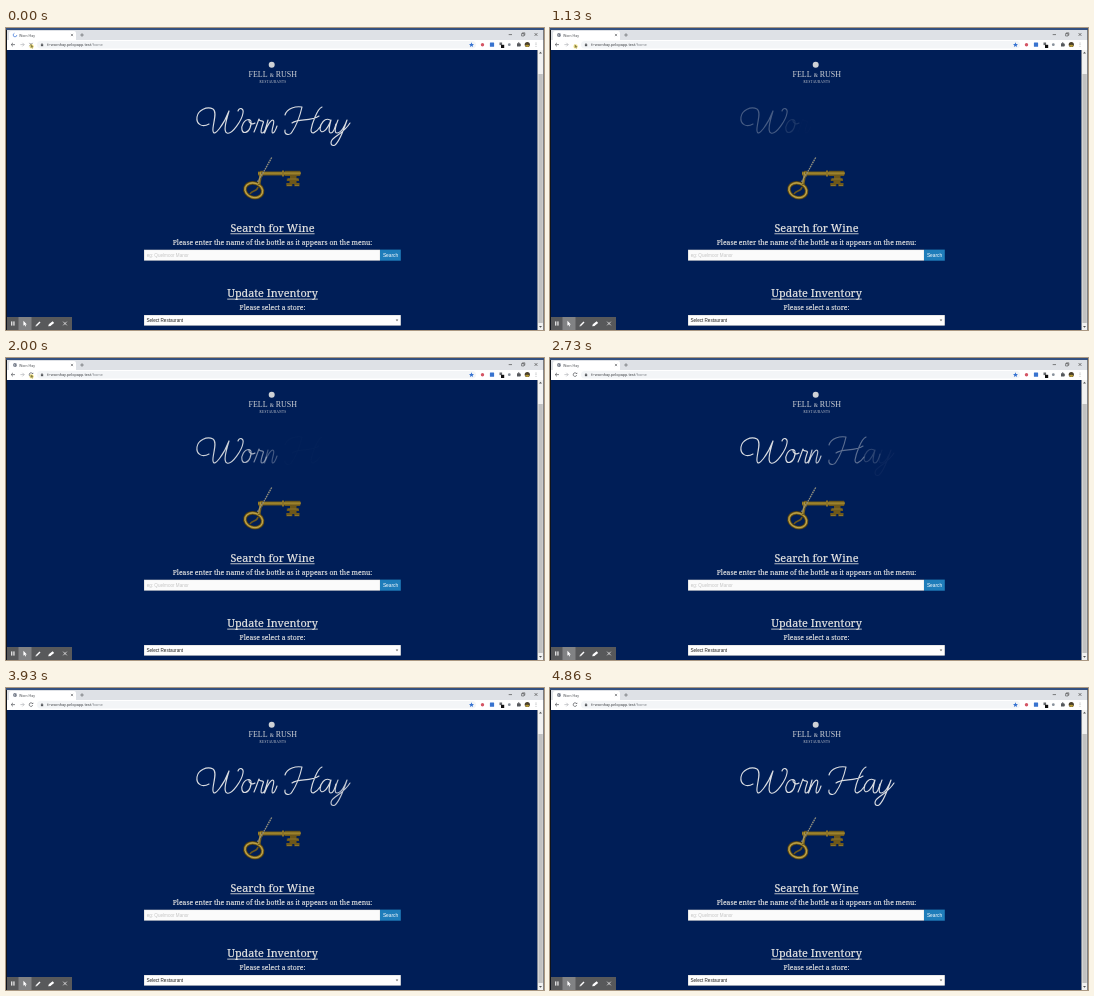
An HTML page with a canvas for the animation above (4.93 s loop, 538 by 302 pixels).

```html
<!DOCTYPE html>
<html lang="en">
<head>
<meta charset="utf-8">
<title>Worn Hay</title>
<style>
  html, body { margin: 0; width: 100%; height: 100%; overflow: hidden; background: #001e57; }
  canvas { display: block; width: 538px; height: 302px; }
</style>
</head>
<body>
<canvas id="stage"></canvas>
<script>
const W = 538, H = 302, LOOP = 4930;
const RELOADED = 400;       // old page disappears
const FADE = { start: 400, step: 295, length: 1900 };
const SANS = '"Liberation Sans", Arial, sans-serif';
const UI = 'Roboto, sans-serif';
const SLAB = '"Noto Serif", serif';
const ROMAN = '"Liberation Serif", serif';
const NAVY = '#001e57', CREAM = '#e4e4e2', LOGO = '#cfd2d6', INK = '#55585c';

const canvas = document.getElementById('stage');
const ctx = canvas.getContext('2d');
const dpr = window.devicePixelRatio || 1;
canvas.width = Math.round(W * dpr);
canvas.height = Math.round(H * dpr);

function rect(x, y, w, h, color) {
  ctx.fillStyle = color;
  ctx.fillRect(x, y, w, h);
}

function round(x, y, w, h, r, color) {
  ctx.fillStyle = color;
  ctx.beginPath();
  ctx.roundRect(x, y, w, h, r);
  ctx.fill();
}

function disc(x, y, r, color) {
  ctx.fillStyle = color;
  ctx.beginPath();
  ctx.arc(x, y, r, 0, Math.PI * 2);
  ctx.fill();
}

function stroke(d, color, width = 0.8) {
  ctx.strokeStyle = color;
  ctx.lineWidth = width;
  ctx.stroke(new Path2D(d));
}

function fill(d, color) {
  ctx.fillStyle = color;
  ctx.fill(new Path2D(d));
}

function text(str, x, y, size, font, color, align = 'left') {
  ctx.font = `${size}px ${font}`;
  ctx.fillStyle = color;
  ctx.textAlign = align;
  ctx.fillText(str, x, y);
  return ctx.measureText(str).width;
}

function cross(x, y, r, color, width) {
  stroke(`M${x - r} ${y - r}L${x + r} ${y + r}M${x + r} ${y - r}L${x - r} ${y + r}`, color, width);
}

function arc(x, y, r, from, to, color, width) {
  ctx.strokeStyle = color;
  ctx.lineWidth = width;
  ctx.beginPath();
  ctx.arc(x, y, r, from, to);
  ctx.stroke();
}

function drawTabs(t) {
  rect(0, 0, W, H, '#10141c');
  rect(0, 0, W, 2, '#34507f');
  rect(1, 2, 536.5, 10, '#dee1e6');
  round(3, 3, 67, 10, [2, 2, 0, 0], '#ffffff');
  if (t < RELOADED) {
    const a = t / 110;
    arc(9, 7, 1.8, a, a + 4.4, '#3f78d8', 0.7);
  } else {
    disc(9, 7, 1.9, '#6a7280');
    stroke('M7.8 6.2L9 7L8.6 8.3M9.5 5.6L10.4 6.6', '#ffffff', 0.5);
  }
  text('Worn Hay', 13, 8.5, 3.7, UI, '#55585c');
  cross(66, 7, 1.1, INK, 0.6);
  stroke('M74.2 7H77.8M76 5.2V8.8', INK, 0.6);
  stroke('M502.7 6.6H506', '#333333', 0.6);
  stroke('M515.6 5.6H518V8H515.6ZM516.4 5.6V4.8H518.8V7.2H518', '#333333', 0.5);
  cross(530, 6.5, 1.4, '#333333', 0.6);
}

function drawReload(t) {
  if (t < RELOADED) {
    cross(25, 16.5, 1.6, INK, 0.7);
  } else if (t >= 1700) {
    arc(25, 16.6, 1.8, 0.3, 5.4, INK, 0.7);
    fill('M25.5 16.1H27.2V14.4Z', INK);
  }
  if (t < 2300) {
    disc(25.6, 18.4, 2.2, 'rgba(245, 222, 70, 0.6)');
    fill('M24.7 16.2V20L25.6 19.2L26.2 20.5L26.9 20.2L26.3 18.9H27.5Z', '#857d4a');
  }
}

function drawToolbar(t) {
  rect(1, 12, 536.5, 10, '#ffffff');
  round(31, 13, 439, 7.6, 3.8, '#f3f5f7');
  stroke('M9 16.6H5.2M7 14.8L5.2 16.6L7 18.4', INK, 0.7);
  stroke('M14.4 16.6H18.2M16.4 14.8L18.2 16.6L16.4 18.4', '#b4b7bb', 0.7);
  drawReload(t);
  rect(34.9, 16.2, 2.3, 2, INK);
  arc(36, 16.2, 0.7, Math.PI, Math.PI * 2, INK, 0.5);
  const host = text('fr-wornhay.pelopapp.test', 41, 18.1, 4, UI, '#44474b');
  text('/home', 41 + host, 18.1, 4, UI, '#85898e');

  fill('M465.5 14.3L466.2 15.9L468 16.1L466.7 17.2L467.1 18.9L465.5 18L463.9 18.9L464.3 17.2L463 16.1L464.8 15.9Z', '#3874d1');
  disc(476.5, 16.8, 1.7, '#d45565');
  round(483.9, 14.5, 4.2, 4.2, 0.5, '#3873cf');
  rect(493.5, 14.5, 2.6, 2.6, '#66696d');
  rect(495, 16.8, 3.2, 3.2, '#101010');
  disc(503.3, 16.7, 1.4, '#87909a');
  round(511, 15.2, 3.4, 3.4, 0.4, INK);
  disc(512.7, 15, 0.7, INK);
  disc(514.4, 17, 0.7, INK);
  disc(521.3, 16.5, 2.6, '#4a3f2a');
  fill('M519 17.6C520 16.4 522.6 16.4 523.6 17.6C523 19.4 519.6 19.4 519 17.6Z', '#b59a35');
  for (const y of [15, 16.6, 18.2]) disc(530, y, 0.4, INK);
}

function drawScrollbar() {
  rect(531.5, 22, 6, 280, '#f1f1f1');
  rect(532.4, 46, 4.4, 249, '#c1c1c1');
  fill('M533 25.5L534.5 23.7L536 25.5Z', '#505050');
  fill('M533 298L534.5 299.8L536 298Z', '#505050');
}

function drawLogo() {
  disc(265.7, 36.7, 3, LOGO);
  text('FELL', 242.5, 49.3, 8, ROMAN, LOGO);
  text('&', 265.8, 48.8, 5.4, ROMAN, LOGO, 'center');
  text('RUSH', 291, 49.3, 8, ROMAN, LOGO, 'right');
  ctx.letterSpacing = '0.4px';
  text('RESTAURANTS', 267, 54.5, 3.2, ROMAN, LOGO, 'center');
  ctx.letterSpacing = '0px';
}

// Handwritten title: one pen path per letter, "slot" sets its turn.
const TITLE = [
  { slot: 0, d: 'M203 96C196 100 190 96 191 89C192 82 201 78 207 81C212 84 206 98 207 103C208 110 218 96 223 83C220 93 217 104 221 105C226 107 236 92 237 85C238 80 233 79 232 83' },
  { slot: 1, d: 'M243 91.5C238 91.5 235 98 236 102C237 106 242 105 244 100C246 95 245 91 243 92C242.5 95 246 97 249 95' },
  { slot: 2, d: 'M248 104C250 100 251 96 253 91C253 94 257 92 257.5 94C255.5 100 254 105 256 105C258 105 259.5 102 260.5 99' },
  { slot: 3, d: 'M262 92L258.5 105C261 98 265.5 90 267.5 92.5C269 95 264.5 103 266.5 105C268.5 105.5 270 101 271 98' },
  { slot: 5, d: 'M279 87C281 80 290 78 296 79C294 88 290 98 286 104C284 108 278 107 279 102M286 95C293 90 304 94 313 88M316 79C311 81 306 96 305 102C305 107 310 105 314 99' },
  { slot: 6, d: 'M324 92C319 89 314 96 314 101C315 107 321 103 325 92C323 99 322 105 325 105C327 105 329 100 330 96' },
  { slot: 7, d: 'M332 92C329 99 328 105 331 105C335 105 339 98 341 92C338 101 334 113 329 117C325 119 323 114 328 110C333 106 339 103 344 95' }
];

function letterAlpha(t, slot) {
  if (t < RELOADED) return 1;
  const p = (t - FADE.start - slot * FADE.step) / FADE.length;
  const q = Math.min(1, Math.max(0, p));
  return 0.5 - 0.5 * Math.cos(Math.PI * q);
}

function drawTitle(t) {
  ctx.lineCap = ctx.lineJoin = 'round';
  for (const { slot, d } of TITLE) {
    ctx.globalAlpha = letterAlpha(t, slot);
    stroke(d, '#d9dce1', 1.15);
  }
  ctx.globalAlpha = 1;
  ctx.lineCap = 'butt';
  ctx.lineJoin = 'miter';
}

function drawKey() {
  const gold = ctx.createLinearGradient(0, 143, 0, 149);
  gold.addColorStop(0, '#594813');
  gold.addColorStop(0.35, '#a68a30');
  gold.addColorStop(1, '#473810');

  // bow
  ctx.save();
  ctx.translate(247.8, 162.3);
  ctx.rotate(0.32);
  for (const [color, width] of [['#4d3e10', 3.6], ['#94792a', 2.2], ['#cdb65c', 0.7]]) {
    ctx.strokeStyle = color;
    ctx.lineWidth = width;
    ctx.beginPath();
    ctx.ellipse(0, 0, 9, 7.2, 0, 0, Math.PI * 2);
    ctx.stroke();
  }
  ctx.restore();
  stroke('M244 166C246 162 251 164 252 159', '#6d581c', 1.5);

  // shaft and bit
  fill('M252 143.5H279V142.8H294L295 145L294 148H279V147.5H252Z', gold);
  rect(255, 142.8, 2, 5.8, '#75601f');
  rect(276, 142.5, 2, 6, '#8c7328');
  fill('M284 148H290.5V150.5H293V153H290.5V155H293.5V158.3H288.3V156H286.3V158.3H280.3V155H283.5V153H280.8V150.5H284Z', '#6e581a');
  stroke('M282 151H292M281 157.5H285.5M289 157.5H293', '#98802f', 0.7);
  stroke('M253 157L255.5 143', '#75601f', 2.6);
  stroke('M252.6 156L254.8 144', '#c4a849', 0.8);

  // chain
  ctx.setLineDash([1.7, 0.7]);
  stroke('M265.7 129.5L259 141.5L251.5 154', '#96937f', 1.3);
  ctx.setLineDash([]);
}

// A hairline outline gives the serif face a sturdier slab weight.
function slab(str, y, size) {
  const w = text(str, 266.5, y, size, SLAB, CREAM, 'center');
  ctx.strokeStyle = CREAM;
  ctx.lineWidth = size * 0.02;
  ctx.strokeText(str, 266.5, y);
  return w;
}

function heading(str, y, size) {
  const w = slab(str, y, size);
  rect(266.5 - w / 2, y + 1.6, w, 0.8, CREAM);
}

function drawForms() {
  heading('Search for Wine', 203.8, 10.9);
  slab('Please enter the name of the bottle as it appears on the menu:', 216.7, 6.8);
  rect(138, 221.7, 236, 10.9, '#cacaca');
  rect(138.4, 222.1, 235.4, 10.1, '#fbfbfb');
  text('eg: Quelmoor Manor', 140.7, 228.6, 4.6, SANS, '#c5c5c5');
  rect(374, 221.6, 20.8, 11.1, '#1f7dba');
  text('Search', 384.5, 228.7, 4.8, SANS, '#ffffff', 'center');

  heading('Update Inventory', 269.1, 10.8);
  slab('Please select a store:', 282.1, 6.8);
  rect(138, 287, 256.8, 10.6, '#cacaca');
  rect(138.4, 287.4, 256, 9.8, '#fefefe');
  text('Select Restaurant', 140.5, 293.8, 4.6, SANS, '#222222');
  fill('M389.7 291.6H392.3L391 293.2Z', '#666666');
}

function drawRecorder() {
  rect(1, 289, 65, 13, '#58595b');
  rect(12.5, 289, 13, 13, '#818284');
  rect(5.2, 293.4, 1.1, 4.2, '#ffffff');
  rect(7.4, 293.4, 1.1, 4.2, '#ffffff');
  fill('M17.4 292.7V297.7L18.5 296.7L19.3 298.4L20.1 298L19.3 296.4H20.9Z', '#ffffff');
  stroke('M30.5 297.4L34 293.9', '#ffffff', 1.4);
  fill('M29.5 298.4L30 296.8L31.1 297.9Z', '#ffffff');
  stroke('M43.6 297.1L47.4 294.1', '#ffffff', 2.4);
  fill('M42.2 298.3L43 295.8L45 298Z', '#ffffff');
  cross(59, 295.5, 1.8, '#ffffff', 0.7);
}

function draw(t) {
  ctx.setTransform(dpr, 0, 0, dpr, 0, 0);
  drawTabs(t);
  drawToolbar(t);
  rect(1, 22, 530.5, 280, NAVY);
  drawScrollbar();
  drawLogo();
  drawTitle(t);
  drawKey();
  drawForms();
  drawRecorder();
}

function tick() {
  draw(performance.now() % LOOP);
  requestAnimationFrame(tick);
}
tick();
</script>
</body>
</html>
```
